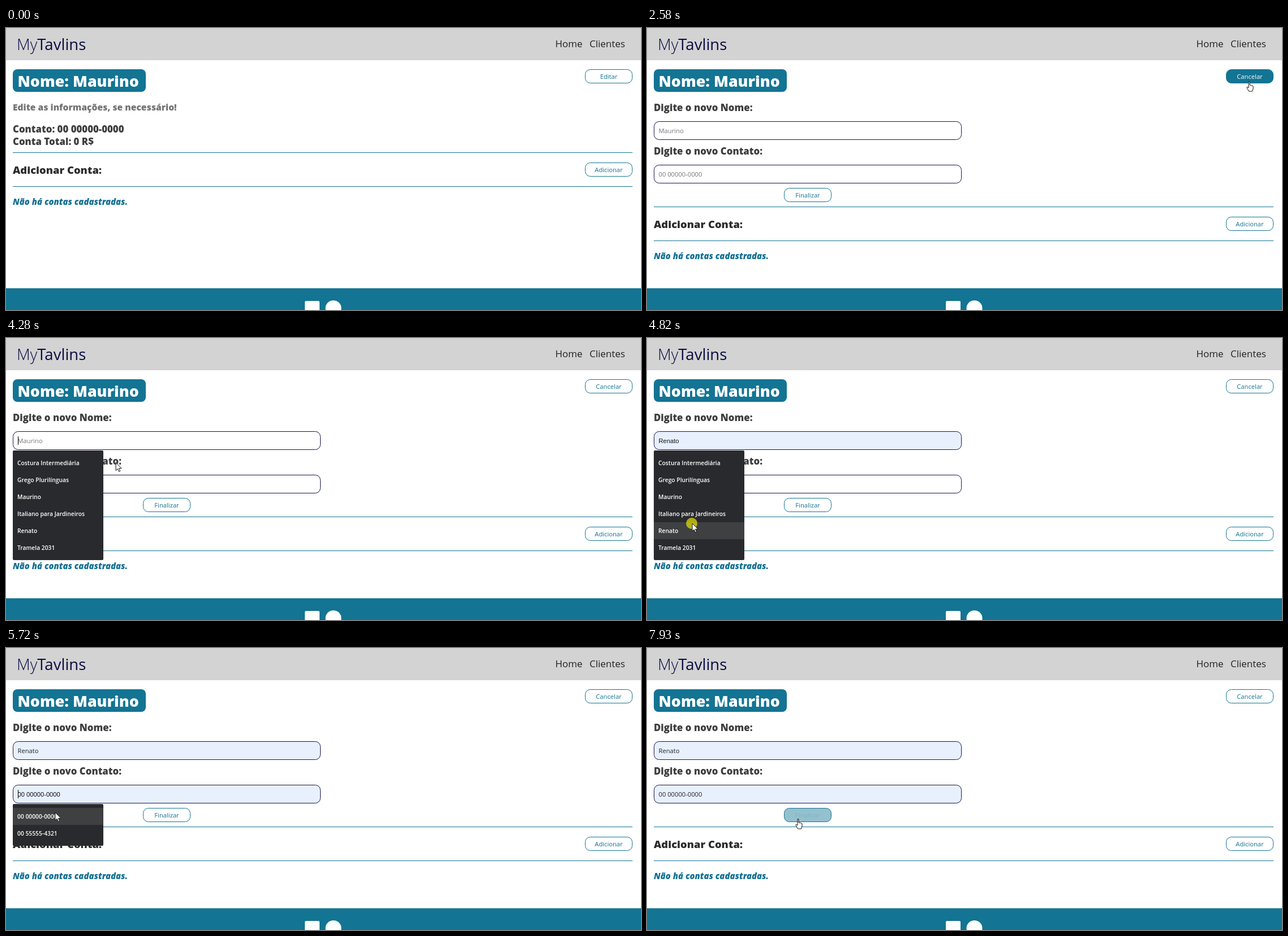
Write an HTML page that moves like this. It is 1122 px wide and 499 px high and loops after 8 s.

```html
<!DOCTYPE html>
<html lang="pt-BR">
<head>
<meta charset="utf-8">
<title>MyTavlins</title>
<style>
  html, body { margin: 0; width: 100%; height: 100%; overflow: hidden; background: #fff; }
  svg { display: block; width: 1122px; height: 499px; font-family: "Open Sans", sans-serif; }
  text { white-space: pre; }
  .teal { fill: #137493; }
  .logo { font-size: 27.5px; fill: #0b0b43; }
  .nav { font-size: 17px; fill: #1f2124; }
  .title { font-size: 26.8px; font-weight: 800; fill: #fff; }
  .hint { font-size: 15.6px; font-weight: 800; fill: #737373; }
  .label { font-size: 16.8px; font-weight: 800; fill: #3e3e3e; }
  .section { font-size: 18.4px; font-weight: 800; fill: #2c2c2c; }
  .empty { font-size: 14.9px; font-weight: 800; font-style: italic; fill: #147093; }
  .button { font-size: 11.2px; text-anchor: middle; }
  .value { font-size: 11.2px; fill: #222; }
  .placeholder { font-size: 11.2px; fill: #757575; }
  .preview { font: 11.2px "Liberation Sans", sans-serif; fill: #111; }
  .item { font-size: 10.3px; font-weight: 600; fill: #fff; }
</style>
</head>
<body>
<svg viewBox="0 0 1122 499">
  <rect width="1122" height="57" fill="#d3d3d3"/>
  <text class="logo" x="19" y="39"><tspan font-weight="300">My</tspan>Tavlins</text>
  <text class="nav" x="970.4" y="34">Home</text>
  <text class="nav" x="1031" y="34">Clientes</text>
  <rect class="teal" x="12" y="73" width="235" height="40" rx="8"/>
  <text class="title" x="20.5" y="103.5">Nome: Maurino</text>
  <rect class="teal" y="460.5" width="1122" height="39"/>
  <rect x="528" y="483" width="26" height="26" rx="2" fill="#fff"/>
  <circle cx="578.5" cy="496" r="14" fill="#fff"/>
  <g id="view"></g>
</svg>
<script>
const LOOP = 8000, FORM = 2400;
const PHONE = '00 00000-0000';
const NAMES = ['Costura Intermediária', 'Grego Plurilínguas', 'Maurino',
  'Italiano para Jardineiros', 'Renato', 'Tramela 2031'];
const PHONES = [PHONE, '00 55555-4321'];
const CLICKS = [2300, 3950, 4820, 5400, 7020];

// time, x, y, and the pointer shape from then on
const PATH = [
  [460, 1022, 475, 'arrow'], [860, 886, 369], [1120, 886, 369], [1190, 878, 367],
  [1500, 948, 280], [1600, 1026, 245], [1740, 1041, 221], [1880, 1050, 104],
  [1950, 1060, 96, 'hand'], [2080, 1064, 94], [2780, 1064, 94],
  [2830, 1000, 99, 'arrow'], [3120, 395, 162], [3300, 250, 211],
  [3420, 243, 194, 'beam'], [4150, 243, 194], [4260, 200, 215, 'arrow'],
  [4690, 80, 328], [4980, 80, 328], [5300, 88, 262, 'beam'],
  [5650, 88, 262, 'arrow'], [5720, 87, 291], [5930, 93, 322], [6190, 93, 322],
  [6470, 92, 298], [7230, 92, 298], [7790, 267, 302, 'hand']
];
const POINTERS = {
  arrow: '<path d="M0 0V14L3.2 11 5.4 16 7.6 15 5.4 10.2H10Z" fill="#fff" stroke="#111"/>',
  hand: '<path d="M-1 1Q0-.6 1 1V7Q5 7 7 9V13L5.5 18H-.5L-4 12Q-4.6 10-2.6 10.5L-1 12Z" fill="#fff" stroke="#111"/>',
  beam: '<path d="M-2.5-6H-.5L0-5.5.5-6H2.5M0-5.5V5.5M-2.5 6H2.5" fill="none" stroke="#222"/>'
};

const clamp = v => Math.max(0, Math.min(1, v));
const mix = (a, b, k) => a + (b - a) * k;
const within = (t, a, b) => t >= a && t < b;
const hover = (t, from, to) => clamp((t - from) / 200) - clamp((t - to) / 200);
const fade = k => `rgb(${[19, 116, 147].map(c => Math.round(mix(255, c, k)))})`;
const text = (kind, x, y, s) => `<text class="${kind}" x="${x}" y="${y}">${s}</text>`;
const line = y => `<rect class="teal" x="12" y="${y}" width="1095" height="1"/>`;

function button(x, y, label, k = 0) {
  return `<rect x="${x + .5}" y="${y + .5}" width="83" height="24" rx="9" fill="${fade(k)}" stroke="#137493"/>
    <text class="button" x="${x + 42}" y="${y + 17}" fill="${fade(1 - k)}">${label}</text>`;
}

function input(y, kind, value, caret) {
  const fill = kind === 'placeholder' ? '#fff' : '#e8f0fe';
  return `<rect x="12.5" y="${y + .5}" width="543" height="32" rx="9" fill="${fill}" stroke="#15154f"/>`
    + text(kind, 20.5, y + 21, value)
    + (caret ? `<rect x="21" y="${y + 9}" width="1" height="15"/>` : '');
}

function dropdown(y, items, row) {
  return `<rect x="12" y="${y}" width="160" height="${items.length * 30 + 14}" rx="2" fill="#292a2d"/>`
    + (row < 0 ? '' : `<rect x="12" y="${y + 7 + row * 30}" width="160" height="30" fill="#3f4042"/>`)
    + items.map((s, i) => text('item', 20, y + 26 + i * 30, s)).join('');
}

function rowAt(p, y, items) {
  const row = Math.floor((p.y - y - 7) / 30);
  return p.x < 172 && row >= 0 && row < items.length ? row : -1;
}

function pointer(t) {
  let shape = 'arrow', i = 0;
  while (i < PATH.length && PATH[i][0] <= t) shape = PATH[i++][3] || shape;
  const a = PATH[Math.max(0, i - 1)], b = PATH[Math.min(i, PATH.length - 1)];
  const k = b[0] > a[0] ? (t - a[0]) / (b[0] - a[0]) : 0;
  return { x: mix(a[1], b[1], k), y: mix(a[2], b[2], k), shape };
}

function field(y, placeholder, row, items, chosen, caret) {
  if (chosen) return input(y, 'value', chosen, caret);
  return row < 0 ? input(y, 'placeholder', placeholder, caret) : input(y, 'preview', items[row], caret);
}

function form(t, p) {
  const nameOpen = within(t, 4090, 4960), phoneOpen = within(t, 5500, 7160);
  const nameRow = nameOpen ? rowAt(p, 199, NAMES) : -1;
  const phoneRow = phoneOpen ? rowAt(p, 276, PHONES) : -1;
  return {
    fields: text('label', 12, 147, 'Digite o novo Nome:')
      + field(165, 'Maurino', nameRow, NAMES, t >= 4960 && 'Renato', within(t, 3950, 4450))
      + text('label', 12, 224, 'Digite o novo Contato:')
      + field(242, PHONE, phoneRow, PHONES, t >= 7160 && PHONE, within(t, 5430, 6190))
      + button(242, 283, 'Finalizar', hover(t, 7840, LOOP)),
    list: (nameOpen ? dropdown(199, NAMES, nameRow) : '')
      + (phoneOpen ? dropdown(276, PHONES, phoneRow) : '')
  };
}

function details() {
  return text('hint', 12, 146, 'Edite as informações, se necessário!')
    + text('label', 12, 185, 'Contato: ' + PHONE)
    + text('label', 12, 207, 'Conta Total: 0 R$');
}

function render(t) {
  const p = pointer(t), editing = t >= FORM, dy = editing ? 96 : 0;
  const edit = editing ? form(t, p) : { fields: details(), list: '' };
  const lit = CLICKS.some(c => within(t, c, c + 150));
  const glow = lit ? `<circle cx="${p.x - 1}" cy="${p.y}" r="10" fill="#fffa00" opacity=".62"/>` : '';
  const mouse = t < PATH[0][0] ? '' : `<g transform="translate(${p.x} ${p.y})">${POINTERS[p.shape]}</g>`;
  return button(1023, 73, editing ? 'Cancelar' : 'Editar', hover(t, 1930, 2830))
    + edit.fields
    + line(220 + dy)
    + text('section', 12, 258 + dy, 'Adicionar Conta:')
    + button(1023, 238 + dy, 'Adicionar', hover(t, 1500, 1540))
    + line(280 + dy)
    + text('empty', 12, 313 + dy, 'Não há contas cadastradas.')
    + edit.list + glow + mouse;
}

const view = document.getElementById('view');
const start = performance.now();
function tick() {
  const t = (performance.now() - start) % LOOP;
  view.innerHTML = render(Math.min(t, 7930));
  requestAnimationFrame(tick);
}
tick();
</script>
</body>
</html>
```
